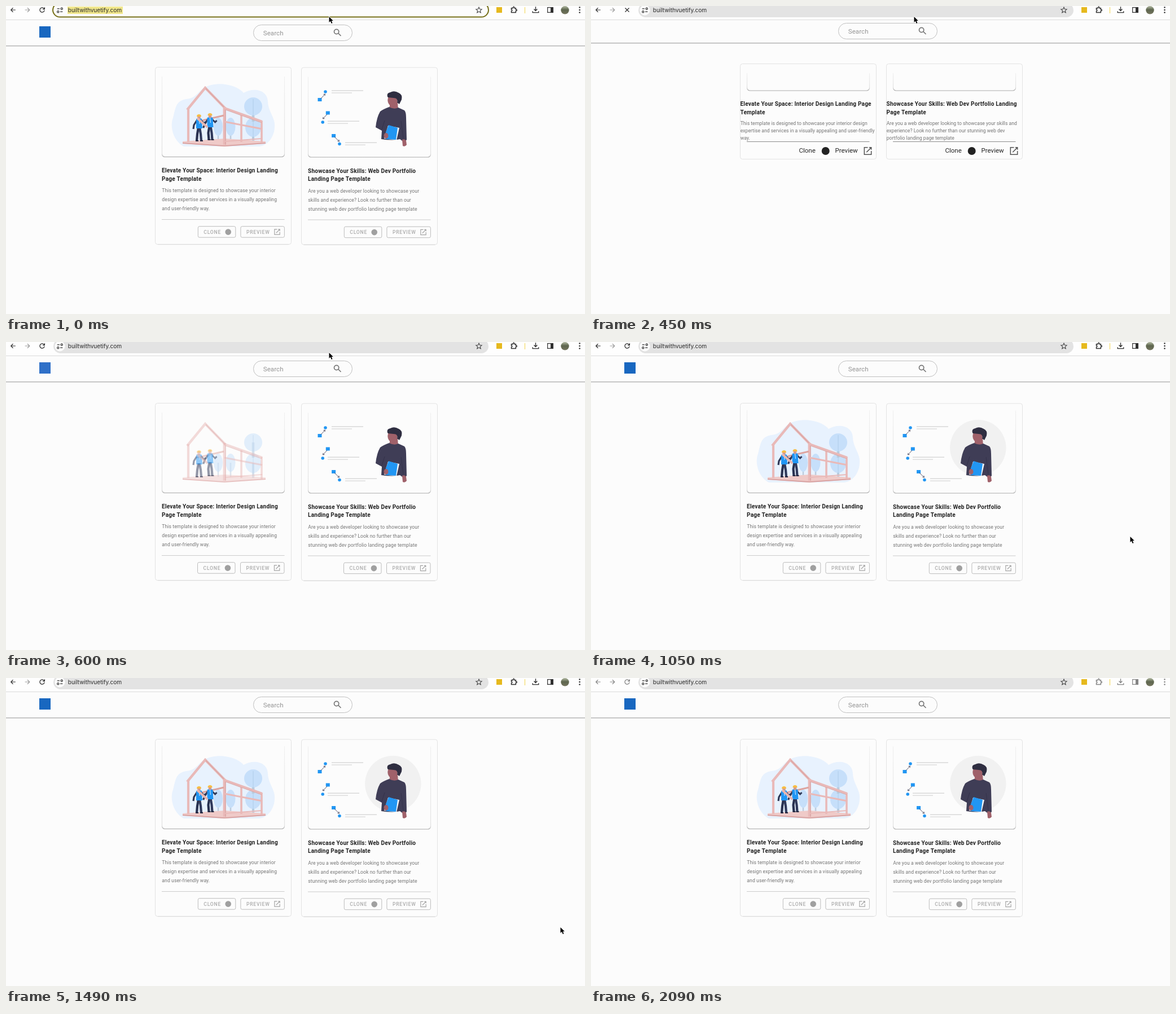
Recreate the animation shown at these times as an HTML page with a canvas. Size 1026 by 546 pixels, loop 2190 ms.

```html
<!DOCTYPE html>
<html lang="en">
<head>
<meta charset="utf-8">
<title>Template gallery reload</title>
<style>
html, body { margin: 0; width: 100%; height: 100%; overflow: hidden; background: #fcfcfc; }
canvas { display: block; width: 1026px; height: 546px; }
</style>
</head>
<body>
<canvas id="stage"></canvas>
<script>
const W = 1026, H = 546, LOOP = 2190;
const canvas = document.getElementById('stage');
const ctx = canvas.getContext('2d');
const ratio = window.devicePixelRatio || 1;
canvas.width = W * ratio;
canvas.height = H * ratio;

const BLUE = '#2196f3', NAVY = '#2f2e41', COAT = '#3f3d56', SKIN = '#a0616a', PINK = '#e9b9b8';

// Icons are stroked on a 24-unit grid.
const ICONS = {
  back: 'M20 12H5M12 5l-7 7 7 7',
  forward: 'M4 12h15M12 5l7 7-7 7',
  reload: 'M19 13a7 7 0 1 1-2-6l2 2M19.5 4v5.5H14',
  stop: 'M6 6L18 18M18 6L6 18',
  search: 'M15 10a5.5 5.5 0 1 1-11 0 5.5 5.5 0 0 1 11 0M14 14l6 6',
  open: 'M12 4H4v16h16v-8M15 4h5v5M20 4L9 15',
  puzzle: 'M4 7h5V5.5a2 2 0 0 1 4.5 0V7H18v4.5h1.5a2 2 0 0 1 0 4H18V21H4v-4.5a2.4 2.4 0 0 0 0-5z',
  download: 'M12 2v12M7 9.5l5 5 5-5M3 16v4h18v-4',
  panel: 'M3 4h18v16H3z',
  star: 'M12 3l2.7 6.2 6.8.6-5.2 4.4 1.6 6.6-5.9-3.5-5.9 3.5 1.6-6.6-5.2-4.4 6.8-.6z',
  tune: 'M3 7h8M21 7a3 3 0 1 1-6 0 3 3 0 0 1 6 0M13 17h8M9 17a3 3 0 1 1-6 0 3 3 0 0 1 6 0',
  info: 'M21 12a9 9 0 1 1-18 0 9 9 0 0 1 18 0M12 11v6M12 7v2'
};
for (const key in ICONS) ICONS[key] = new Path2D(ICONS[key]);

const CARDS = [
  {
    x: 264.5, dy: 0, art: drawHouse,
    title: ['Elevate Your Space: Interior Design Landing', 'Page Template'],
    body: ['This template is designed to showcase your interior', 'design expertise and services in a visually appealing', 'and user-friendly way.'],
    bareTitle: ['Elevate Your Space: Interior Design Landing Page', 'Template'],
    bareBody: ['This template is designed to showcase your interior design', 'expertise and services in a visually appealing and user-friendly', 'way.']
  },
  {
    x: 523.5, dy: .5, art: drawDeveloper,
    title: ['Showcase Your Skills: Web Dev Portfolio', 'Landing Page Template'],
    body: ['Are you a web developer looking to showcase your', 'skills and experience? Look no further than our', 'stunning web dev portfolio landing page template'],
    bareTitle: ['Showcase Your Skills: Web Dev Portfolio Landing', 'Page Template'],
    bareBody: ['Are you a web developer looking to showcase your skills and', 'experience? Look no further than our stunning web dev', 'portfolio landing page template']
  }
];

// Pointer positions, each held until the next time.
const POINTER = [[0, 572, 19], [1050, 955, 345], [1200, 961, 353], [1340, 984, 427], [1490, 982, 442], [1640, 1011, 522], [1790, -50, -50]];

function text(str, x, y, font, color, spacing = 0) {
  ctx.font = font;
  ctx.letterSpacing = spacing + 'px';
  ctx.fillStyle = color;
  ctx.fillText(str, x, y);
}

function line(points, color, width = 1) {
  ctx.beginPath();
  points.forEach(([x, y]) => ctx.lineTo(x, y));
  ctx.strokeStyle = color;
  ctx.lineWidth = width;
  ctx.stroke();
}

function shape(path, color) {
  ctx.fillStyle = color;
  ctx.fill(new Path2D(path));
}

function rect(x, y, w, h, color) {
  ctx.fillStyle = color;
  ctx.fillRect(x, y, w, h);
}

function oval(x, y, rx, color, ry = rx) {
  ctx.beginPath();
  ctx.ellipse(x, y, rx, ry, 0, 0, Math.PI * 2);
  ctx.fillStyle = color;
  ctx.fill();
}

function box(x, y, w, h, r, stroke, fill, width = 1) {
  ctx.beginPath();
  ctx.roundRect(x, y, w, h, r);
  if (fill) { ctx.fillStyle = fill; ctx.fill(); }
  if (stroke) { ctx.strokeStyle = stroke; ctx.lineWidth = width; ctx.stroke(); }
}

function icon(name, x, y, size, color, width = 2) {
  ctx.save();
  ctx.translate(x - size / 2, y - size / 2);
  ctx.scale(size / 24, size / 24);
  ctx.strokeStyle = color;
  ctx.lineWidth = width;
  ctx.stroke(ICONS[name]);
  ctx.restore();
}

function drawToolbar(t) {
  const focused = t < 300, loading = t >= 300 && t < 600;
  const ink = t >= 2090 ? '#858585' : '#303030';
  rect(0, 0, W, 24, '#fefefe');
  rect(0, 24, W, 1, '#dadada');

  icon('back', 12.5, 7, 13, ink, 2.2);
  icon('forward', 38, 7, 13, t >= 2090 ? ink : '#9b9b9b', 2.2);
  icon(loading ? 'stop' : 'reload', 64, 7, 14, ink, 2.2);

  if (focused) {
    box(83, -5.5, 772, 25, 12.5, '#777019', '#fcfcfc', 2);
    rect(109, 1, 98, 13, '#f0e68a');
  } else {
    box(84, -5, 771, 25, 12.5, null, '#e3e3e3');
    oval(95.5, 7.5, 9, '#fdfdfd');
  }
  icon(t >= 300 && t < 450 ? 'info' : 'tune', 95.5, 7.5, 13, '#333', 2.2);
  text('builtwithvuetify.com', 109.8, 11, '10.2px Inter, sans-serif', '#2b2b2b', -.1);

  icon('star', 838, 7, 13, '#444');
  rect(869, 2, 10, 10, '#e6b91e');
  icon('puzzle', 900, 6.5, 13.5, ink, 2.6);
  rect(919, 2, 1, 11, '#f1d64c');
  icon('download', 938.5, 7, 14, ink, 2.4);
  icon('panel', 964.5, 7, 13, ink, 2.2);
  rect(965, 2.5, 5, 9, ink);

  const photo = ctx.createLinearGradient(0, 0, 0, 15);
  photo.addColorStop(0, '#b4bba4');
  photo.addColorStop(.45, '#5d654d');
  photo.addColorStop(1, '#777761');
  oval(990.5, 7.3, 7.2, photo);
  [2.5, 7, 11.5].forEach(y => oval(1016.5, y, 1.3, ink));
}

function drawHeader(t, bare) {
  const dy = bare ? -3 : 0, edge = bare ? 65 : 70;
  rect(0, edge, W, 1, '#b0b0b0');
  rect(0, edge + 1, W, 1, '#dddddd');
  if (!bare) rect(59, 36, 20, 20, t < 750 && t >= 600 ? '#2f70c8' : '#1867c0');
  box(438.5, 33.5 + dy, 175, 28, 14, '#bfbfbf', '#fcfcfc');
  text('Search', 455.7, 52 + dy, '11.52px Roboto, sans-serif', '#949494', .1);
  icon('search', 587.5, 47 + dy, 18, '#777', 2.3);
}

function drawTray(x, top, bottom) {
  const fade = ctx.createLinearGradient(0, top, 0, bottom);
  fade.addColorStop(0, '#f0f0f0');
  fade.addColorStop(Math.max(0, 1 - 6 / (bottom - top)), '#e2e2e2');
  fade.addColorStop(1, '#a9a9a9');
  ctx.beginPath();
  ctx.moveTo(x, top);
  ctx.arcTo(x, bottom, x + 6, bottom, 5);
  ctx.arcTo(x + 217, bottom, x + 217, top, 5);
  ctx.lineTo(x + 217, top);
  ctx.strokeStyle = fade;
  ctx.lineWidth = 1.2;
  ctx.stroke();
}

function drawButton(label, x, w, y) {
  box(x, y, w, 19.5, 2.5, '#bcbcbc');
  text(label, x + 10, y + 13, '500 8.64px Roboto, sans-serif', '#ababab', .77);
}

function drawCard(card, t) {
  const shift = t >= 600 && t < 750 ? -.8 : 0;
  ctx.save();
  ctx.translate(card.x, card.dy);
  box(0, 108.5, 241, 314, 4, '#e3e3e3', '#fcfcfc');
  line([[4, 422.7], [237, 422.7]], '#d8d8d8');
  drawTray(12, t < 750 ? 125 : 121, 267.5);
  card.title.forEach((s, i) => text(s, 11.6, 295.3 + i * 14.4, 'bold 10.08px Roboto, sans-serif', '#222', .18));
  card.body.forEach((s, i) => text(s, 11.8, 330 + i * 16, '8.64px Roboto, sans-serif', '#757575', .081));
  line([[11.5, 378.5], [229, 378.5]], '#cccccc', 1.2);
  drawButton('CLONE', 75.8 + shift, 66.5, 390.7);
  oval(129.2 + shift, 400.6, 5.3, '#a0a0a0');
  drawButton('PREVIEW', 151.4 + shift / 2, 77.5, 390.7);
  icon('open', 216 + shift / 2, 400.5, 14, '#a3a3a3', 2);
  ctx.restore();
  card.art(t);
}

function drawBareCard(card) {
  ctx.save();
  ctx.translate(card.x, 0);
  box(0, 102.5, 241, 169, 4, '#e3e3e3', '#fcfcfc');
  drawTray(12, 119, 150);
  card.bareTitle.forEach((s, i) => text(s, 0, 177.4 + i * 14.4, 'bold 10.08px Roboto, sans-serif', '#222', .18));
  card.bareBody.forEach((s, i) => text(s, .2, 211 + i * 13, '8.64px Roboto, sans-serif', '#757575'));
  line([[11.5, 240.5], [229, 240.5]], '#8c8c8c');
  text('Clone', 104, 260.3, '11.52px Roboto, sans-serif', '#222');
  oval(151.2, 257, 7, '#222');
  text('Preview', 168, 260.3, '11.52px Roboto, sans-serif', '#222');
  icon('open', 226, 257, 18.5, '#555', 2);
  ctx.restore();
}

function drawTree(x, y, rx, ry, foot) {
  rect(x - rx * .15, y, rx * .3, foot - y, '#bdcddd');
  oval(x, y, rx, '#c6dffa', ry);
}

function drawWorker(x, y, lean) {
  ctx.save();
  ctx.translate(x, y);
  line([[-1, 23], [-3, 35], [-3 - lean, 47]], '#293251', 4.2);
  line([[1, 23], [3, 35], [4, 47]], '#303a5c', 4.2);
  line([[-4, 11], [-9, 19], [-11 + lean, 26]], '#303957', 3.2);
  line([[4, 11], [9, 16], [12, 13]], '#303957', 3);
  shape('M-5 8Q0 6 5 8L6 25H-5z', BLUE);
  line([[0, 8], [1, 17]], '#dcecff', 1);
  oval(0, 5, 2.8, '#d49a8c', 3.4);
  shape('M-4 4Q-4 0 0 0Q4 0 4 4z', '#f8bd43');
  rect(-5 - lean, 46, 5, 2, '#252a42');
  rect(2, 46, 5, 2, '#252a42');
  ctx.restore();
}

function drawHouse(t) {
  const faint = t >= 600 && t < 750;
  ctx.save();
  if (!faint) {
    shape('M315 249C296 239 290 213 296 198C301 180 300 169 319 165C342 163 339 147 360 141C382 134 410 141 421 154C441 143 464 150 464 170C465 188 478 199 476 215C475 234 462 249 447 249z', '#e8f2fe');
  }
  ctx.globalAlpha = faint ? .5 : 1;
  drawTree(438, 215, 14, 17, 241);
  drawTree(438, 178, 16, 16, 205);
  line([[438, 165], [438, 235]], '#a9c7e6', .8);
  drawTree(376, 214, 8, 16, 239);
  drawTree(398, 214, 8.5, 16, 239);

  shape('M313 240L388 235L460 240V244L387 249L313 244z', '#efcac8');
  line([[313, 243], [387, 248], [460, 243]], '#d9a3a2', 2.2);
  line([[323, 241], [323, 181]], PINK, 4.2);
  line([[321, 184], [353, 145], [389, 182]], PINK, 4.4);
  line([[354, 146], [388, 181]], '#d8a2a1', 1.2);
  line([[387, 179], [387, 246]], PINK, 4.8);
  line([[389, 183], [389, 246]], '#d6a09f', 1.2);
  line([[387, 181], [454, 205]], PINK, 4);
  line([[387, 205], [454, 218]], PINK, 3.2);
  line([[388, 240], [454, 235]], PINK, 2);
  line([[417, 192], [417, 241]], PINK, 3.6);
  line([[453, 204], [453, 243]], PINK, 3.6);
  line([[389, 184], [453, 207]], '#d6a09f', .8);

  line([[339, 205], [386, 194]], '#dda5a0', 3.2);
  drawWorker(342, 192, 1);
  drawWorker(361.5, 190, -1);
  line([[339, 199], [357, 215]], '#e8b6b0', 4);
  ctx.restore();
}

function drawArrow(x1, y1, x2, y2) {
  const a = Math.atan2(y2 - y1, x2 - x1);
  const barb = d => [x2 - 3.2 * Math.cos(a + d), y2 - 3.2 * Math.sin(a + d)];
  line([[x1, y1], [x2, y2]], '#4c4a60', .9);
  line([barb(.6), [x2, y2], barb(-.6)], '#4c4a60', .9);
}

function drawDeveloper(t) {
  if (t >= 750) oval(685.8, 187.5, 49.7, '#f1f1f1');

  [[556, 166, 566, 152], [570.3, 189.5, 561.2, 206], [580.6, 230, 591, 244.5]].forEach(([x, y, cx, cy]) => {
    rect(x - 3.5, y - 3, 7, 6, BLUE);
    oval(cx, cy, 2.8, BLUE);
  });
  drawArrow(558, 164, 565.5, 156);
  drawArrow(569, 192, 561.5, 200);
  drawArrow(582, 232, 590.5, 240);
  [[577, 150], [570, 204.2], [601, 242.3]].forEach(([x, y]) => {
    line([[x, y], [x + 56, y]], '#d9d9d9', 1.4);
    line([[x, y + 4], [x + 36, y + 4]], '#dedede', 1.4);
  });

  shape('M681 171H694L695 184Q687 188 679 182z', SKIN);
  shape('M679 179Q688 184 695 180L706 185Q709 188 709 198L710 237Q707 242 702 239L698 236Q685 239 665 236L666 221L655 215Q657 197 663 187Q668 183 679 179z', COAT);
  line([[671, 203], [666, 219]], '#33314a', 1);
  line([[700, 204], [704, 235]], '#33314a', .8);
  oval(685, 167, 8.7, SKIN, 10.5);
  shape('M676 161Q674 154 681 153Q688 149 696 154Q703 157 701 166L697 174L693 171Q695 163 687 163L677 162z', NAVY);
  shape('M702 237Q707 235 709 239L710 246Q707 250 703 248z', SKIN);
  shape('M677 212L697 216L692 238L670 235z', '#f7f9fb');
  shape('M678 211L694 216L691 237L673 236L673 224z', BLUE);
  oval(673.5, 230, 4, SKIN, 5);
}

function drawPointer(t) {
  const [, x, y] = POINTER.filter(p => p[0] <= t).pop();
  ctx.save();
  ctx.translate(x + .5, y);
  const arrow = new Path2D('M0 0V10L2.4 7.8L4.2 12L6 11.2L4.2 7.2H7.4z');
  ctx.lineJoin = 'round';
  ctx.strokeStyle = '#fff';
  ctx.lineWidth = 1.6;
  ctx.stroke(arrow);
  ctx.fillStyle = '#000';
  ctx.fill(arrow);
  ctx.restore();
}

function draw(t) {
  const bare = t >= 450 && t < 600;
  ctx.setTransform(ratio, 0, 0, ratio, 0, 0);
  rect(0, 0, W, H, '#fcfcfc');
  drawToolbar(t);
  drawHeader(t, bare);
  CARDS.forEach(card => bare ? drawBareCard(card) : drawCard(card, t));
  drawPointer(t);
}

const start = performance.now();
function tick() {
  draw((performance.now() - start) % LOOP);
  requestAnimationFrame(tick);
}
tick();
</script>
</body>
</html>
```
